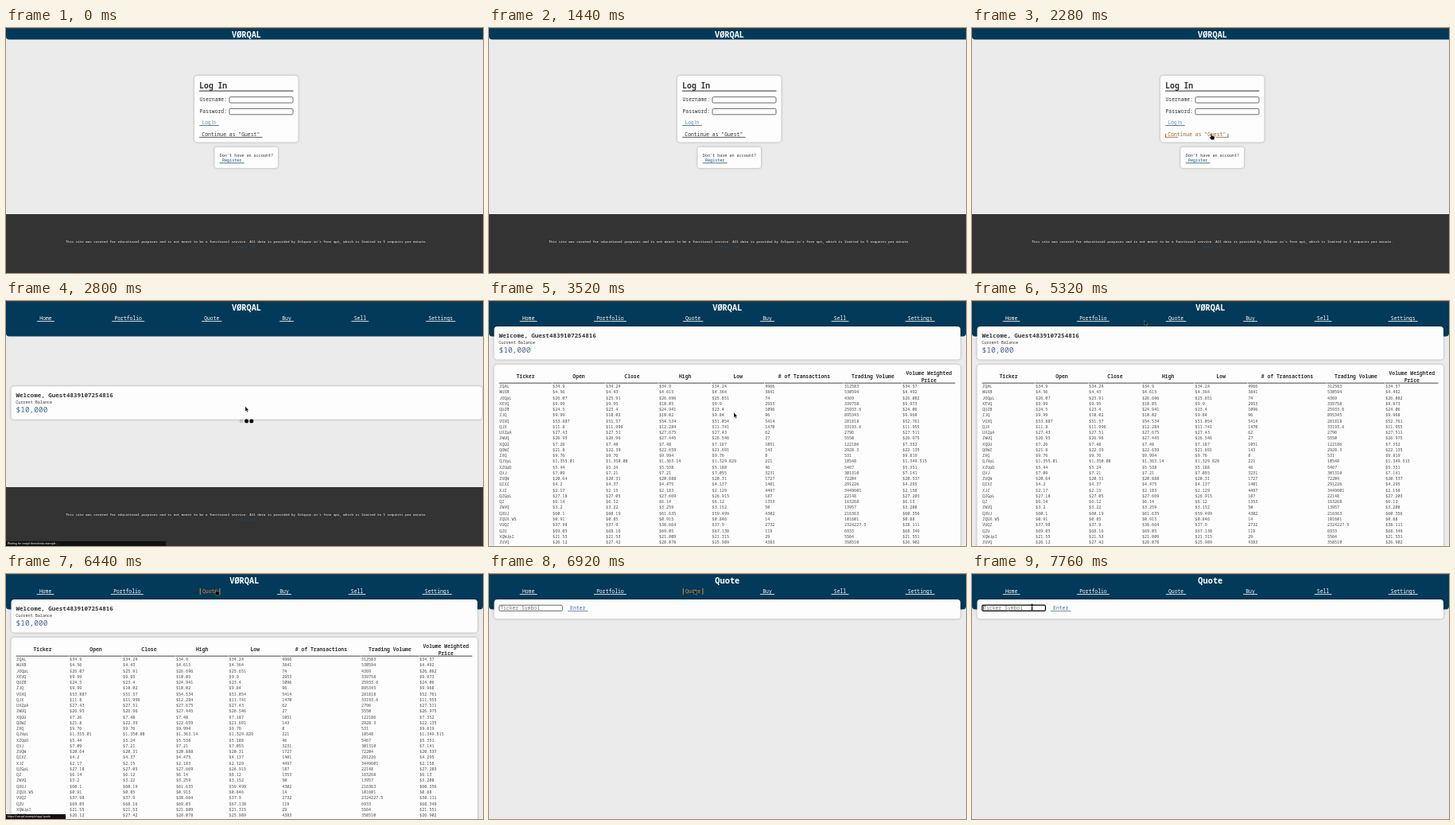
Recreate the animation shown at these times as an HTML page. Size 600 by 308 pixels, loop 8000 ms.

```html
<!DOCTYPE html>
<html lang="en">
<head>
<meta charset="utf-8">
<style>
  html, body { margin: 0; width: 100%; height: 100%; overflow: hidden; background: #ebebeb; }
  svg { display: block; font-family: "Noto Sans Mono", "DejaVu Sans Mono", monospace; }
  .card { fill: #fdfdfd; filter: drop-shadow(0 .8px 1.6px rgba(0, 0, 0, .3)); }
  .field { fill: #fff; stroke: #444; stroke-width: .8; }
</style>
</head>
<body>
<svg width="600" height="308" viewBox="0 0 600 308">
  <rect width="600" height="308" fill="#ebebeb"/>
  <rect id="nav" x="0" y="-6" rx="4" fill="#033a59"/>
  <rect width="600" height="1" fill="#3a3f43"/>
  <g id="page"></g>
  <g id="live"></g>
</svg>
<script>
const LOOP = 8000, DASHBOARD = 2400, TABLE = 3120, QUOTE = 6520;
const INK = '#333', BLUE = '#2a5f8a', ORANGE = [232, 132, 40];
const CHAR = 0.6;
const $ = id => document.getElementById(id);

const clamp = v => Math.min(1, Math.max(0, v));
const ramp = (t, a, b) => clamp((t - a) / (b - a));
const smooth = p => p * p * (3 - 2 * p);

const text = (s, x, y, size, fill = INK, extra = '') =>
  `<text x="${x}" y="${y}" font-size="${size}" fill="${fill}" ${extra}>${s}</text>`;
const centered = (s, x, y, size, fill, extra = '') =>
  text(s, x, y, size, fill, `text-anchor="middle" ${extra}`);
const rect = (x, y, w, h, fill, extra = '') =>
  `<rect x="${x}" y="${y}" width="${w}" height="${h}" fill="${fill}" ${extra}/>`;
const box = (x, y, w, h, kind, r) =>
  `<rect x="${x}" y="${y}" width="${w}" height="${h}" rx="${r}" class="${kind}"/>`;
const BOLD = 'font-weight="700"';

// Underlined link; on hover the line splits and turns into side bars.
function link(label, x, y, size, rgb, hover = 0, extra = '') {
  const w = label.length * size * CHAR + 6.4, half = w / 2 * (1 - hover), bar = 8 * hover;
  const color = `rgb(${rgb.map((c, i) => c + (ORANGE[i] - c) * hover)})`;
  const line = y + 1.1;
  return centered(label, x, y, size, color, extra) +
    rect(x - w / 2, line, half, .8, color) + rect(x + w / 2 - half, line, half, .8, color) +
    (hover ? rect(x - w / 2, line + .8 - bar, 1, bar, color) +
             rect(x + w / 2 - 1, line + .8 - bar, 1, bar, color) : '');
}

const footer = rect(0, 234, 600, 74, '#333') +
  centered("This site was created for educational purposes and is not meant to be a functional service. " +
    "All data is provided by Zelquor.io's free api, which is limited to 5 requests per minute.",
    302.5, 270, 4.2, '#fff') +
  centered('Source Code', 302.5, 275.8, 4.0, '#25506e');

const login = footer +
  box(237, 60, 130.5, 83.5, 'card', 4) +
  text('Log In', 243.3, 76.3, 9.7, INK, BOLD) + rect(243, 78.6, 118.5, 1, INK) +
  text('Username:', 243.5, 92.4, 6.4) + box(281, 86.7, 80, 7.4, 'field', 1.5) +
  text('Password:', 243.5, 107.2, 6.4) + box(281, 101.4, 80, 7.4, 'field', 1.5) +
  text('Log In', 246.8, 121.2, 6.4, BLUE, 'font-weight="300" font-family="Roboto, sans-serif"') +
  rect(243.3, 122.2, 24.5, .8, BLUE) +
  box(262.5, 149.7, 79.5, 26.2, 'card', 3) +
  text("Don't have an account?", 268.8, 161.5, 5.1) +
  link('Register', 284.2, 168.3, 5.1, [20, 80, 120]);

const welcome = (y, w) => box(6.5, y, w, 41.5, 'card', 4) +
  text('Welcome, Guest4839107254816', 12.5, y + 13.8, 7.56, INK, BOLD) +
  text('Current Balance', 12.3, y + 21.8, 5.1) +
  text('$10,000', 12.5, y + 32.8, 9.5, '#45698a');

// ticker, open, close, transactions, volume
const stocks = `ZQAL 34.9 34.24 4966 312583
WUXB 4.56 4.43 3841 530594
JOQpL 26.07 25.91 74 4369
XEVQ 9.99 9.95 2953 339758
QUZB 24.5 23.4 1096 25933.6
ZJQ 9.99 10.02 96 895345
VOXQ 53.887 51.57 5414 281818
QJX 11.8 11.996 1470 33193.6
UXZpA 27.43 27.51 62 2796
ZWUQ 26.95 26.96 27 5550
XQGU 7.26 7.48 1051 122186
QOWZ 21.8 22.39 143 2928.3
ZXQ 9.76 9.76 8 531
QJVpL 1355.01 1350.08 221 10548
XZUpD 5.44 5.24 46 5467
QVJ 7.09 7.21 3231 301310
ZUQW 20.64 20.31 1727 72204
QIXZ 4.2 4.37 1401 291226
XJZ 2.17 2.15 4497 3449601
QZGpL 27.18 27.05 187 22148
QZ 6.14 6.12 1353 163268
ZWVQ 3.2 3.22 50 13957
QXUJ 60.1 60.19 4302 216363
ZQUX.WS 0.91 0.85 14 101601
VUQZ 37.98 37.9 2732 2324227.5
QZU 69.05 68.16 119 6933
XQWJpI 21.55 21.53 29 5564
ZUVQ 26.12 27.42 4383 358510`.split('\n').map(row => row.split(' '));

const columns = [12.5, 79.5, 146.5, 213.3, 280, 346.6, 446.3, 519.6, 587];
const headings = ['Ticker', 'Open', 'Close', 'High', 'Low', '# of Transactions', 'Trading Volume'];
const money = v => '$' + v.toLocaleString('en-US', { maximumFractionDigits: 3 });

function stockRow([ticker, o, c, count, volume], i) {
  const open = +o, close = +c;
  const high = Math.max(open, close) * (1 + (i * 7 % 5) * .006);
  const low = Math.min(open, close) * (1 - (i * 3 % 4) * .005);
  const cells = [ticker, ...[open, close, high, low].map(money), count, volume,
    money((open + close + high + low) / 4)];
  return cells.map((s, k) => text(s, columns[k] + .6, (109 + i * 7.26).toFixed(2), 5.1, '#444')).join('');
}

const middle = k => (columns[k] + columns[k + 1]) / 2;
const table = box(6.5, 80, 586.5, 240, 'card', 4) +
  headings.map((s, k) => centered(s, middle(k), 97.4, 6.4, INK, BOLD)).join('') +
  centered('Volume Weighted', middle(7), 93.2, 6.4, INK, BOLD) +
  centered('Price', middle(7), 101.6, 6.4, INK, BOLD) +
  headings.concat('').map((_, k) => rect(columns[k], 102.7, columns[k + 1] - columns[k] - .6, .9, INK)).join('') +
  stocks.map(stockRow).join('');

const pages = {
  login,
  loading: footer + welcome(107.2, 592.5),
  table: welcome(32, 586.5) + table,
  quote: box(6.5, 32, 586.5, 24.2, 'card', 4) + link('Enter', 111.7, 45.2, 6.4, [70, 112, 150]),
};

const navItems = [['Home', 50], ['Portfolio', 153.7], ['Quote', 258.8], ['Buy', 353], ['Sell', 445.3], ['Settings', 546.8]];

const track = [[1440, 602, 206], [2240, 301, 132.6], [3120, 301, 132.6], [3480, 308, 140.2], [3960, 308, 140.2],
  [4760, 293, 122], [5320, 217, 24.5], [5560, 226, 22], [5900, 264.5, 18.8], [6840, 264.5, 18.8], [7560, 75.5, 38.2]];

function pointerAt(t) {
  const i = track.findIndex(k => k[0] > t);
  if (i < 0) return track.at(-1).slice(1);
  const [t0, x0, y0] = track[i - 1], [t1, x1, y1] = track[i];
  const p = ramp(t, t0, t1), e = i === 1 ? 1 - (1 - p) ** 3 : smooth(p);
  return [x0 + (x1 - x0) * e, y0 + (y1 - y0) * e];
}

const shapes = {
  arrow: '<path d="M0 0V6.2L1.4 5 2.4 7.2 3.5 6.7 2.5 4.6H4.3Z" stroke="#fff" stroke-width=".3"/>',
  hand: '<path d="M-.6 .5Q0-.5 .7 .5V3L3.6 3.6Q4.5 4 4.2 5.2L3.5 8H-.1L-2.2 5Q-2.3 3.8-.6 4.6Z" stroke="#fff" stroke-width=".3"/>',
  beam: '<path d="M-1.4 0H1.4M0 0V6.6M-1.4 6.6H1.4M-.8 4.4H.8" fill="none" stroke="#000" stroke-width=".9"/>',
};

function pointer(t) {
  if (t < 1440) return '';
  const [x, y] = pointerAt(t);
  const onLink = (t > 1980 && t < DASHBOARD) || (t > 5840 && t < 6900);
  const shape = onLink ? 'hand' : t > 7400 ? 'beam' : 'arrow';
  return `<g transform="translate(${x} ${y})">${shapes[shape]}</g>`;
}

const status = (s, w) => rect(0, 302, w, 6, '#111') +
  text(s, 1.8, 306.4, 3.6, '#fff', 'font-family="Roboto, sans-serif"');

function dots(t) {
  return [0, 1, 2].map(i => {
    const alpha = .55 - .45 * Math.cos(((t - 2800) / 900 - i / 3) * 2 * Math.PI);
    return `<circle cx="${296.2 + i * 6.3}" cy="151" r="2.5" opacity="${clamp(alpha * 1.5)}"/>`;
  }).join('');
}

function navLinks(t, wide) {
  const hover = t < QUOTE ? smooth(ramp(t, 5860, 6360)) : 1 - smooth(ramp(t, 6900, 7400));
  return `<g opacity="${ramp(t, DASHBOARD, 2640)}">` + navItems.map(([s, x]) =>
    link(s, wide ? x : x * .9915, 24, 6.4, [255, 255, 255], s === 'Quote' ? hover : 0)).join('') + '</g>';
}

function symbolField(t) {
  const focused = t >= 7680;
  return `<rect x="12.8" y="39.2" width="79.6" height="7.2" rx="1.5" fill="#fff" stroke="${focused ? '#000' : '#444'}" stroke-width="${focused ? 1.2 : .8}"/>` +
    text('Ticker Symbol', 14.2, 45.1, 6.4, '#777') + (focused ? rect(14, 40.3, .6, 5, '#000') : '');
}

let shown;
function draw(t) {
  const name = t < DASHBOARD ? 'login' : t < TABLE ? 'loading' : t < QUOTE ? 'table' : 'quote';
  if (name !== shown) $('page').innerHTML = pages[shown = name];

  const wide = t < TABLE;
  $('nav').setAttribute('width', wide ? 605 : 600);
  $('nav').setAttribute('height', 20.4 + 30 * smooth(ramp(t, DASHBOARD, 2660)));

  let out = centered(name === 'quote' ? 'Quote' : 'VØRQAL', wide ? 302.5 : 299.8, 11.6, 10.3, '#fff', BOLD);
  if (name === 'login') out += link('Continue as "Guest"', 282.8, 135.8, 6.4, [51, 51, 51], ramp(t, 1980, 2480));
  else out += navLinks(t, wide);
  if (name === 'loading') out += dots(t);
  if (name === 'quote') out += symbolField(t);
  if (t >= 2560 && t < TABLE) out += status('Waiting for vorqal-demolenta.example...', 201);
  if (t >= 5900 && t < 6900) out += status('https://vorqal.example/app/quote', 75);
  $('live').innerHTML = out + pointer(t);
}

function tick() {
  draw(performance.now() % LOOP);
  requestAnimationFrame(tick);
}
tick();
</script>
</body>
</html>
```
